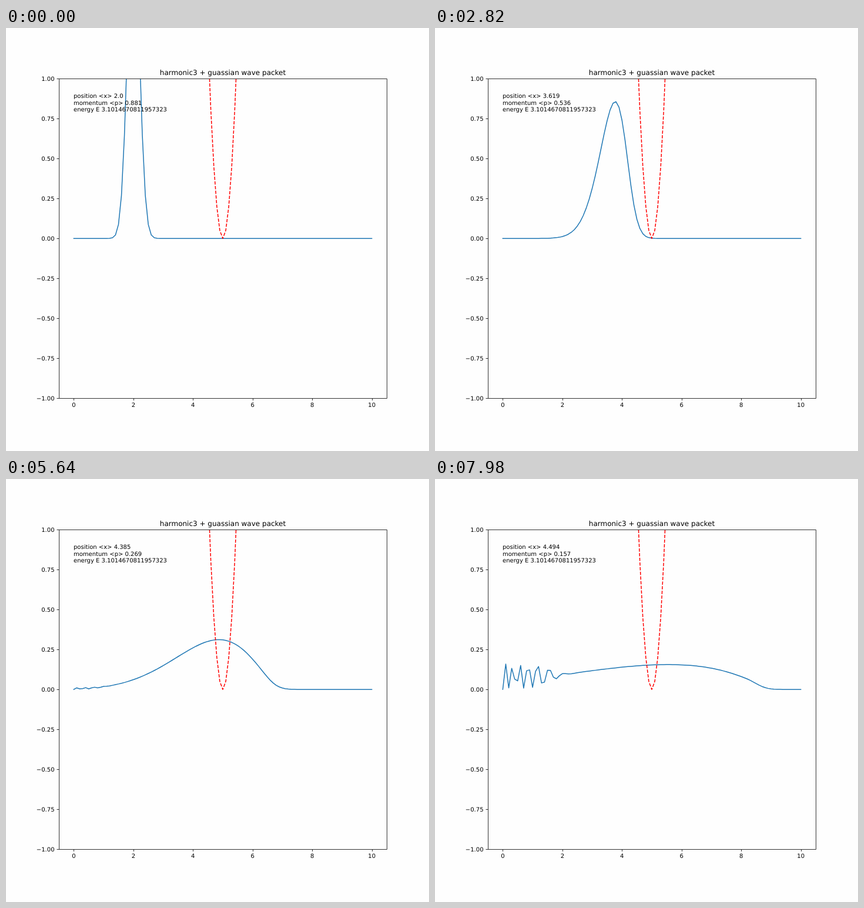
Write an HTML page that moves like this. It is 720x720 px and loops after 8000 ms.

```html
<!DOCTYPE html>
<html lang="en">
<head>
<meta charset="utf-8">
<title>Wave packet</title>
<style>
  html, body { margin: 0; width: 100%; height: 100%; overflow: hidden; background: #fefefe; }
  svg { display: block; width: 720px; height: 720px; }
  text { font: 10px "DejaVu Sans", sans-serif; fill: #000; text-rendering: geometricPrecision; white-space: pre; }
  .title { font-size: 12px; }
  .line { fill: none; stroke-width: 1.5; stroke-linejoin: round; }
  .axis { fill: none; stroke: #000; stroke-width: .8; }
</style>
</head>
<body>
<svg viewBox="0 0 720 720">
  <clipPath id="plot"><rect x="90" y="86.4" width="558" height="543.6"/></clipPath>
  <g clip-path="url(#plot)">
    <path id="wave" class="line" stroke="#1f77b4" stroke-linecap="square"/>
    <path id="well" class="line" stroke="#f00" stroke-dasharray="5.55 2.4"/>
  </g>
  <path id="axes" class="axis"/>
  <g id="labels"></g>
</svg>
<script>
const STEP_MS = 60, LOOP_MS = 8000, FRAMES = Math.ceil(LOOP_MS / STEP_MS);
const N = 101, DX = 0.1, DT = 1e-4, SUBSTEPS = 50;
const HOP = 0.5 / DX ** 2;
const ENERGY = '3.1014670811957323';

const $ = id => document.getElementById(id);
const px = x => 90 + 558 * (x + 0.5) / 11;
const py = y => 358.2 - 271.8 * y;
const snap = v => Math.floor(v + 0.5) + 0.5;
const potential = x => 5 * (x - 5) ** 2;
const toPath = points => 'M' + points.map(([x, y]) => px(x).toFixed(2) + ' ' + py(y).toFixed(2)).join('L');
const grid = Array.from({ length: N }, (_, i) => i * DX);

function addText(str, x, y, anchor = 'start', cls = '') {
  const el = document.createElementNS('http://www.w3.org/2000/svg', 'text');
  el.setAttribute('x', x);
  el.setAttribute('y', y);
  el.setAttribute('text-anchor', anchor);
  el.setAttribute('class', cls);
  el.textContent = str;
  $('labels').append(el);
  return el;
}

function drawAxes() {
  let d = 'M90.5 86.5H648.5V630.5H90.5Z';
  for (let x = 0; x <= 10; x += 2) {
    d += `M${snap(px(x))} 630.5v3.5`;
    addText(x, px(x), 645, 'middle');
  }
  for (let y = -1; y <= 1; y += 0.25) {
    d += `M90.5 ${snap(py(y))}h-4`;
    addText((y < 0 ? '\u2212' : '') + Math.abs(y).toFixed(2), 82.5, Math.round(py(y) + 3.6), 'end');
  }
  $('axes').setAttribute('d', d);
  addText('harmonic3 + guassian wave packet', 369, 80, 'middle', 'title');
}

// The dashes start where the polyline enters the stage at its top edge.
function drawWell() {
  const top = (358.2 + 1) / 271.8;
  const inside = grid.filter(x => potential(x) < top);
  const first = inside[0], outer = first - DX;
  const entry = outer + DX * (potential(outer) - top) / (potential(outer) - potential(first));
  const points = inside.map(x => [x, potential(x)]);
  $('well').setAttribute('d', toPath([[entry, top], ...points, [10 - entry, top]]));
}

// Explicit Euler steps of the Schroedinger equation; each frame is normalised.
function simulate() {
  const v = grid.map(potential);
  let re = new Float64Array(N), im = new Float64Array(N);
  let nextRe = new Float64Array(N), nextIm = new Float64Array(N);
  for (let i = 1; i < N - 1; i++) {
    const amp = Math.exp(-((grid[i] - 2) ** 2) / 0.16);
    re[i] = amp * Math.cos(20 * grid[i]);
    im[i] = amp * Math.sin(20 * grid[i]);
  }
  const energyOp = (f, i) => (2 * HOP + v[i]) * f[i] - HOP * (f[i - 1] + f[i + 1]);

  function measure() {
    const density = grid.map((_, i) => re[i] ** 2 + im[i] ** 2);
    const sum = density.reduce((a, b) => a + b);
    let position = 0, momentum = 0;
    for (let i = 1; i < N - 1; i++) {
      position += grid[i] * density[i];
      momentum += (re[i] * (im[i + 1] - im[i - 1]) - im[i] * (re[i + 1] - re[i - 1])) / 2;
    }
    return {
      path: toPath(grid.map((x, i) => [x, density[i] / (sum * DX)])),
      position: position / sum,
      momentum: momentum / sum
    };
  }

  const frames = [measure()];
  while (frames.length < FRAMES) {
    for (let s = 0; s < SUBSTEPS; s++) {
      for (let i = 1; i < N - 1; i++) {
        nextRe[i] = re[i] + DT * energyOp(im, i);
        nextIm[i] = im[i] - DT * energyOp(re, i);
      }
      [re, nextRe] = [nextRe, re];
      [im, nextIm] = [nextIm, im];
    }
    frames.push(measure());
  }
  return frames;
}

function format(value) {
  const s = String(Math.round(value * 1000) / 1000);
  return s.includes('.') ? s : s + '.0';
}

drawAxes();
drawWell();
const frames = simulate();
const positionText = addText('', 115, 119);
const momentumText = addText('', 115, 131);
addText('energy E ' + ENERGY, 115, 142);

let shown = -1;
const start = performance.now();
function tick() {
  const index = Math.floor(((performance.now() - start) % LOOP_MS) / STEP_MS);
  if (index !== shown) {
    shown = index;
    const f = frames[index];
    $('wave').setAttribute('d', f.path);
    positionText.textContent = 'position <x> ' + format(f.position);
    momentumText.textContent = 'momentum <p> ' + format(f.momentum);
  }
  requestAnimationFrame(tick);
}
tick();
</script>
</body>
</html>
```
